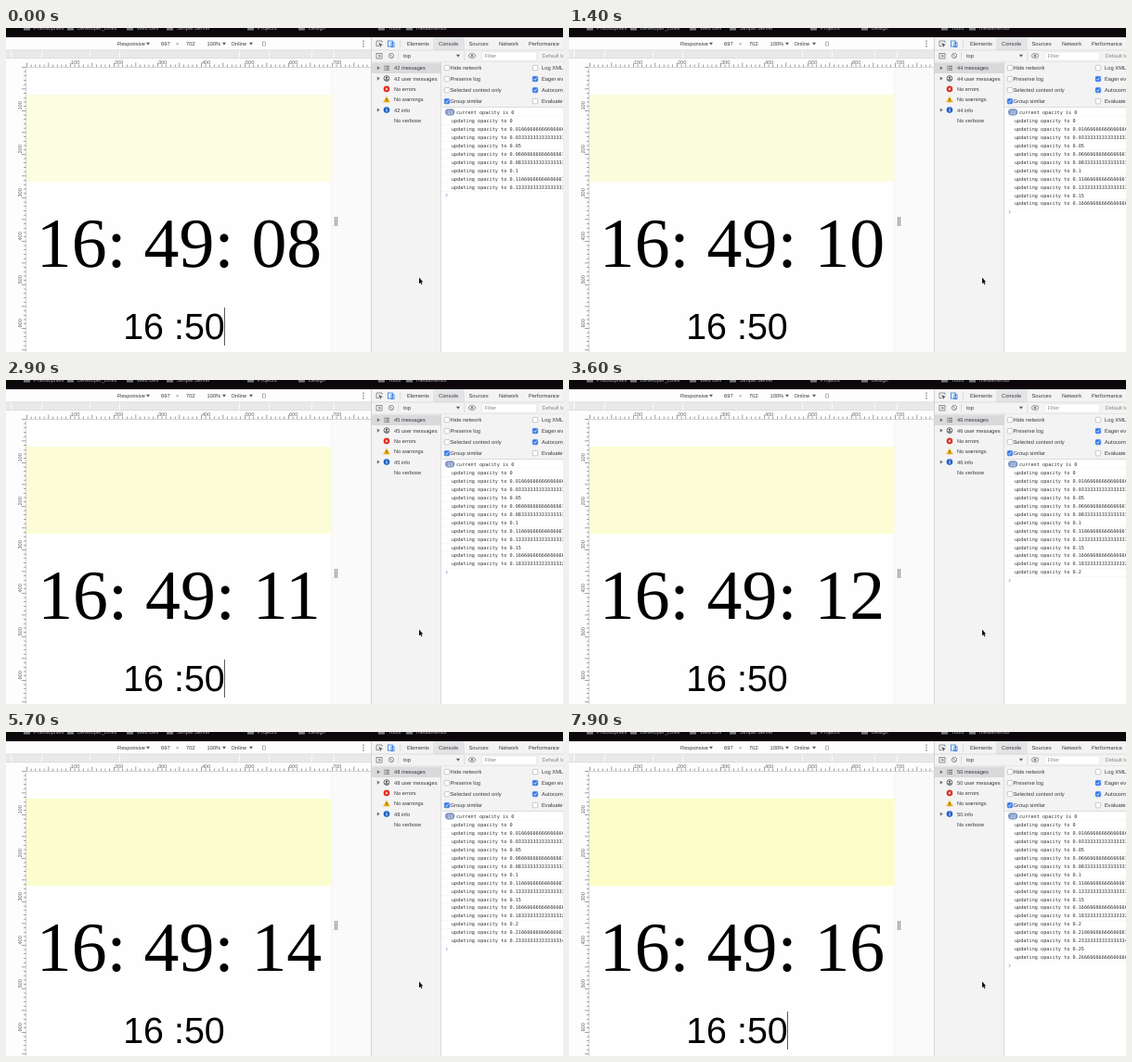
Recreate the animation shown at these times as an HTML page with a canvas. Size 600 px wide and 350 px high, loop 8000 ms.

```html
<!DOCTYPE html>
<html lang="en">
<head>
<meta charset="utf-8">
<title>Clock and console</title>
<style>
html, body { margin: 0; width: 100%; height: 100%; overflow: hidden; background: #fff; }
canvas { display: block; }
</style>
</head>
<body>
<canvas id="stage" width="600" height="350"></canvas>
<script>
const LOOP = 8000, FIRST_TICK = 390, CARET_ON = 890;
const SANS = '"Liberation Sans", sans-serif';
const SERIF = '"Liberation Serif", serif';
const MONO = '"DejaVu Sans Mono", monospace';
const INK = '#3c3c40', GREY = '#77777b', BLUE = '#2f78e0';
const ctx = document.getElementById('stage').getContext('2d');
ctx.textRendering = 'geometricPrecision';

function rect(x, y, w, h, color) {
  ctx.fillStyle = color;
  ctx.fillRect(x, y, w, h);
}

function text(s, x, y, size = 5.75, color = INK, font = SANS, align = 'left') {
  ctx.font = `${size}px ${font}`;
  ctx.textAlign = align;
  ctx.fillStyle = color;
  ctx.fillText(s, x, y);
}

function poly(points, color) {
  ctx.fillStyle = color;
  ctx.beginPath();
  points.forEach(([x, y]) => ctx.lineTo(x, y));
  ctx.fill();
}

function disc(x, y, r, color) {
  ctx.fillStyle = color;
  ctx.beginPath();
  ctx.arc(x, y, r, 0, 7);
  ctx.fill();
}

function line(points, color, width = 0.8) {
  ctx.strokeStyle = color;
  ctx.lineWidth = width;
  ctx.beginPath();
  points.forEach(([x, y]) => ctx.lineTo(x, y));
  ctx.stroke();
}

function frame(x, y, w, h, color, width = 0.8) {
  ctx.strokeStyle = color;
  ctx.lineWidth = width;
  ctx.strokeRect(x, y, w, h);
}

function ring(x, y, r, color) {
  ctx.strokeStyle = color;
  ctx.lineWidth = 0.8;
  ctx.beginPath();
  ctx.arc(x, y, r, 0, 7);
  ctx.stroke();
}

const down = (x, y) => poly([[x - 2, y - 1.3], [x + 2, y - 1.3], [x, y + 1.6]], '#555');
const right = (x, y) => poly([[x - 1.2, y - 2], [x + 1.8, y], [x - 1.2, y + 2]], '#6e6e6e');

function bookmarks() {
  rect(0, 0, 600, 10, '#0c070b');
  const items = [['Philosophies', 30], ['Developer_Links', 77], ['Web Dev', 141],
    ['Simple Server', 184], ['Projects', 271], ['Design', 326], ['Tools', 412], ['mediamentor', 442]];
  for (const [name, x] of items) {
    rect(x - 11, 0, 7, 2.5, '#77757a');
    text(name, x, 2.3, 5.7, '#aaa8ac');
  }
}

function toolbar() {
  rect(0, 10, 393, 14, '#fdfdfd');
  text('Responsive', 120, 19.2);
  text('697', 167, 19.2);
  text('×', 183, 19.2, 5.75, GREY);
  text('702', 194, 19.2);
  text('100%', 216.5, 19.2);
  text('Online', 242.5, 19.2);
  [153, 235, 264].forEach(x => down(x, 17));
  frame(276.5, 15, 3, 4, '#999', 0.7);
  [14.3, 17, 19.7].forEach(y => disc(385, y, 0.7, '#555'));
  rect(0, 24, 393, 9, '#e9e9e9');
  [5, 38, 90, 122, 251, 283, 329, 353].forEach(x => rect(x, 24, 1, 9, '#fafafa'));
  rect(0, 23.5, 393, 0.6, '#d4d4d4');
  rect(0, 32.5, 393, 0.6, '#d4d4d4');
}

function rulers() {
  const step = 4.7;
  rect(22, 42, 371, 0.6, '#bbb');
  rect(21.2, 43, 0.6, 307, '#bbb');
  for (let i = 0; i < 79; i++) {
    const len = i % 5 ? 2.5 : 4.5;
    rect(22 + i * step, 42 - len, 0.7, len, '#777');
    if (i < 66) rect(21.5 - len, 42 + i * step, len, 0.7, '#777');
  }
  for (let n = 1; n < 8; n++) {
    const at = n * 47;
    text(n * 100, 22 + at + 1, 39.4, 5.6, '#666');
    ctx.save();
    ctx.translate(17.4, 42 + at - 0.5);
    ctx.rotate(-Math.PI / 2);
    text(n * 100, 0, 0, 5.6, '#666');
    ctx.restore();
  }
}

function page(t, k) {
  rect(22, 43, 329, 307, '#fefefe');
  rect(351, 43, 42, 307, '#fafafa');
  rect(350.5, 43, 0.6, 307, '#eee');
  rect(22, 72, 328.5, 94.3, `rgb(252 253 ${225 - 27 * t / LOOP})`);
  rect(354, 204, 0.9, 10, '#777');
  rect(356, 204, 0.9, 10, '#777');
  text('16: 49: ' + String(8 + k).padStart(2, '0'), 186.5, 258.3, 75.8, '#000', SERIF, 'center');
  text('16 :50', 126.2, 335.8, 39.4, '#000');
  if ((t - CARET_ON + LOOP) % 1000 < 500) rect(235.2, 302, 0.8, 41, '#333');
}

function tabs() {
  rect(393, 10, 207, 27, '#f3f3f4');
  rect(460, 10, 34, 14, '#e4e4e6');
  rect(393, 23.7, 207, 0.6, '#cdcdcd');
  rect(393, 36.7, 207, 0.6, '#cdcdcd');
  [['Elements', 432], ['Console', 466], ['Sources', 498.5], ['Network', 531], ['Performance', 563]]
    .forEach(([name, x]) => text(name, x, 19));
  line([[402, 19.5], [399, 19.5], [399, 14], [405, 14], [405, 16]], GREY);
  poly([[401.5, 16], [406, 18.2], [404, 18.8], [403.3, 21]], '#555');
  frame(411.5, 14, 5, 6, BLUE);
  frame(415, 16, 3, 4.5, BLUE);
  rect(424.5, 13, 0.6, 8, '#ccc');

  frame(399, 27.5, 6, 5.5, GREY);
  poly([[401.5, 28.6], [404, 30.2], [401.5, 31.8]], GREY);
  ring(415, 30, 2.6, GREY);
  line([[413.2, 28.2], [416.8, 31.8]], GREY);
  rect(422.5, 26, 0.6, 9, '#ccc');
  text('top', 428, 32);
  down(487, 30);
  rect(493.5, 26, 0.6, 9, '#ccc');
  ctx.strokeStyle = GREY;
  ctx.lineWidth = 0.8;
  ctx.beginPath();
  ctx.ellipse(502, 30, 3.6, 2.4, 0, 0, 7);
  ctx.stroke();
  disc(502, 30, 1.2, GREY);
  rect(512.5, 26, 59, 9, '#fff');
  frame(512.5, 26, 59, 9, '#dedede', 0.5);
  text('Filter', 515.5, 32, 5.75, '#8a8a8a');
  text('Default levels', 577.5, 32, 5.75, '#8a8a8a');
}

function person(x, y) {
  ring(x, y, 2.9, '#444');
  disc(x, y - 0.8, 1.1, '#444');
  rect(x - 1.7, y + 0.8, 3.4, 1.2, '#444');
}

function sidebar(n) {
  rect(393, 37, 76, 313, '#f3f3f4');
  rect(394, 37.5, 74.5, 11.5, '#dadadc');
  rect(393, 10, 0.7, 340, '#c6c6c6');
  rect(468.4, 37, 0.6, 313, '#cbcbcb');
  const rows = [`${n} messages`, `${n} user messages`, 'No errors', 'No warnings', `${n} info`, 'No verbose'];
  const y = i => 43.2 + i * 11.35;
  rows.forEach((s, i) => text(s, 418, y(i) + 2, 5.7));
  [0, 1, 4].forEach(i => right(401, y(i)));
  [-2, 0, 2].forEach(d => {
    rect(407, y(0) + d - 0.4, 0.8, 0.8, '#555');
    rect(408.5, y(0) + d - 0.4, 4.5, 0.8, '#555');
  });
  person(410, y(1));
  disc(410, y(2), 3.3, '#dc2f25');
  line([[408.7, y(2) - 1.3], [411.3, y(2) + 1.3]], '#fff');
  line([[411.3, y(2) - 1.3], [408.7, y(2) + 1.3]], '#fff');
  poly([[410, y(3) - 3.4], [413.8, y(3) + 3], [406.2, y(3) + 3]], '#edb314');
  rect(409.6, y(3) - 1.2, 0.8, 2.2, '#443300');
  rect(409.6, y(3) + 1.6, 0.8, 0.8, '#443300');
  disc(410, y(4), 3.3, '#2264c8');
  rect(409.6, y(4) - 0.6, 0.9, 2.5, '#fff');
  rect(409.6, y(4) - 2, 0.9, 0.9, '#fff');
}

function option(x, y, label, on) {
  ctx.beginPath();
  ctx.roundRect(x - 2.7, y - 2.7, 5.4, 5.4, 1);
  ctx.fillStyle = on ? '#3478e5' : '#fff';
  ctx.fill();
  ctx.strokeStyle = on ? '#3478e5' : '#aaa';
  ctx.lineWidth = 0.6;
  ctx.stroke();
  if (on) line([[x - 1.5, y], [x - 0.4, y + 1.4], [x + 1.6, y - 1.5]], '#fff');
  text(label, x + (x < 500 ? 3.5 : 7), y + 2, 5.8);
}

function consolePane(k) {
  rect(469, 37, 131, 49, '#f3f3f4');
  rect(469, 86, 131, 264, '#fff');
  rect(469, 85.3, 131, 0.6, '#cdcdcd');
  [['Hide network', 'Log XMLHttpRequests'], ['Preserve log', 'Eager evaluation'],
    ['Selected context only', 'Autocomplete'], ['Group similar', 'Evaluate triggers']]
    .forEach(([a, b], i) => {
      const y = 43 + i * 12.05;
      option(475, y, a, i === 3);
      option(570, y, b, i === 1 || i === 2);
    });

  const y = i => 91 + i * 8.97;
  ctx.beginPath();
  ctx.roundRect(473, 87.2, 10.3, 7.2, 3.6);
  ctx.fillStyle = '#7d98c4';
  ctx.fill();
  text('33', 478.2, 92.8, 5.2, '#fff', SANS, 'center');
  text('current opacity is 0', 485, 92.8, 5.2, '#303034', MONO);
  const count = 9 + k;
  for (let i = 0; i < count; i++) {
    text('updating opacity to ' + i / 60, 480, y(i + 1) + 1.8, 5.2, '#303034', MONO);
    rect(469, y(i) + 4.4, 131, 0.4, '#eee');
  }
  rect(469, y(count) + 4.4, 131, 0.4, '#eee');
  const p = y(count + 1);
  line([[473.8, p - 1.6], [475.4, p], [473.8, p + 1.6]], '#6b8fd0');
}

function pointer() {
  const shape = [[445, 269.5], [445, 276.3], [446.4, 275], [447.4, 277.2],
    [448.4, 276.7], [447.5, 274.6], [449.3, 274.4]];
  line([...shape, shape[0]], '#fff', 1);
  poly(shape, '#111');
}

function draw(now) {
  const t = now % LOOP;
  const k = Math.max(0, Math.floor((t - FIRST_TICK) / 1000) + 1);
  rect(0, 0, 600, 350, '#fdfdfd');
  bookmarks();
  toolbar();
  page(t, k);
  rulers();
  tabs();
  sidebar(42 + k);
  consolePane(k);
  pointer();
  requestAnimationFrame(draw);
}
requestAnimationFrame(draw);
</script>
</body>
</html>
```
